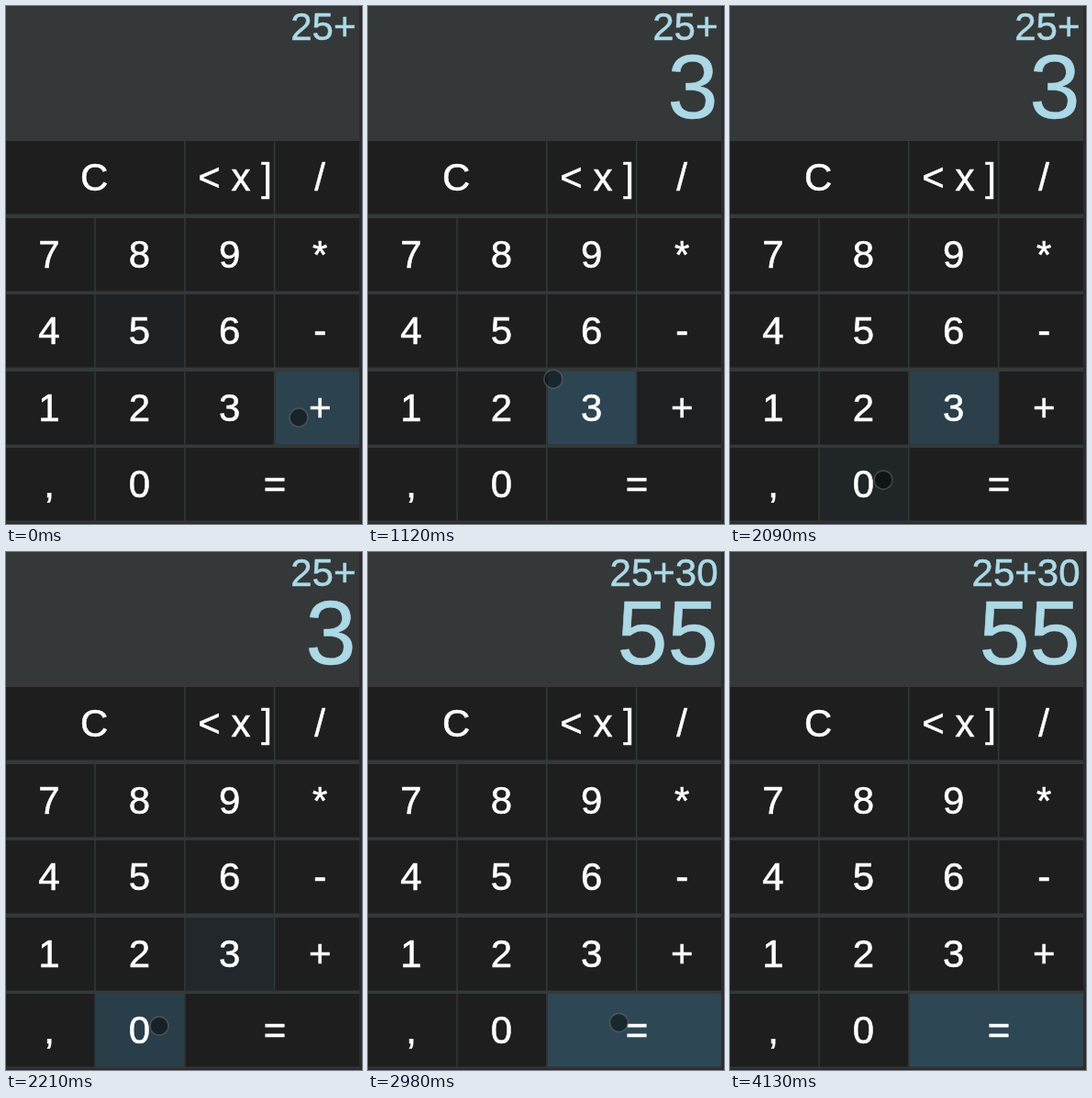
Animation of 388x564 px, one loop 5060 ms. Source, as an HTML page:

```html
<!DOCTYPE html>
<html lang="en">
<head>
<meta charset="utf-8">
<title>Calculator</title>
<style>
  html, body { margin: 0; width: 100%; height: 100%; overflow: hidden; background: #2e2b2d; }
  svg { display: block; width: 388px; height: 564px; }
  text {
    font: 42px "Liberation Sans", Arial, sans-serif; text-anchor: middle; white-space: pre;
    color: #fff; fill: currentColor; stroke: currentColor; stroke-width: .6;
  }
  .out { color: #add8e6; text-anchor: end; }
  .big { font-size: 99px; }
  .key { fill: #1e1e1e; }
  .lit { fill: #2e4755; opacity: 0; }
  #dot { fill: rgba(0, 0, 0, .45); stroke: rgba(110, 115, 118, .5); stroke-width: 1.5; }
</style>
</head>
<body>
<svg viewBox="0 0 388 564">
  <rect width="385" height="562" fill="#343838"/>
  <text class="out" id="expr" x="381.5" y="37"></text>
  <text class="out big" id="value" x="381.5" y="122"></text>
  <g id="keys"></g>
  <circle id="dot" r="10"/>
</svg>
<script>
const LOOP = 5060, STEP = 2980 / 22, FADE = 300;
const COL = 97.8, ROW = 83.6, TOP = 147, EDGE = 385;
const $ = id => document.getElementById(id);

function add(tag, attrs, label = '') {
  const el = document.createElementNS('http://www.w3.org/2000/svg', tag);
  for (const name in attrs) el.setAttribute(name, attrs[name]);
  el.textContent = label;
  return $('keys').appendChild(el);
}

// A repeated character is one wide key
const lit = {};
['CC</', '789*', '456-', '123+', ',0=='].forEach((row, r) => {
  for (const key of new Set(row)) {
    const first = row.indexOf(key), last = row.lastIndexOf(key);
    const x = first * COL, y = Math.round(TOP + r * ROW);
    const width = Math.min(EDGE, (last + 1) * COL - 1.5) - x;
    const box = { x, y, width, height: 79.5 };
    add('rect', { ...box, class: 'key' });
    lit[key] = add('rect', { ...box, class: 'lit' });
    add('text', { x: 47 + 98.4 * (first + last) / 2, y: y + 54 }, key === '<' ? ' < x ]' : key);
  }
});

// Each key takes the focus from the one before it
const presses = [['5', -LOOP], ['+', -200], ['3', 850], ['0', 2000], ['=', 2670]];

const screens = [[0, '25+', ''], [1120, '25+', '3'], [2360, '25+', '30'], [2980, '25+30', '55']];

// Pointer moves: start, duration, target x, target y
const moves = [
  [0, 300, 252, 449], [948, 406, 162, 372], [1354, 406, 167, 516],
  [2303, 406, 273.5, 512.5], [3760, 500, 310, 600]
];

const clamp = p => Math.min(1, Math.max(0, p));
const easeOut = p => 1 - (1 - p) ** 2;

function fade(ms) {
  const p = clamp(ms / FADE) ** .6;
  return p * p * (3 - 2 * p);
}

function pointer(t) {
  let x = 319, y = 448;
  for (const [start, length, toX, toY] of moves) {
    const k = easeOut(clamp((t - start) / length));
    x += (toX - x) * k;
    y += (toY - y) * k;
  }
  return [x, y];
}

function draw(now) {
  const time = Math.max(0, now) % LOOP;
  // Motion is held at a low frame rate
  const t = Math.floor(time / STEP + 1e-6) * STEP;
  const [x, y] = pointer(t);
  $('dot').setAttribute('cx', x);
  $('dot').setAttribute('cy', y);

  const [, expr, value] = screens.findLast(([at]) => at <= time);
  $('expr').textContent = expr;
  $('value').textContent = value;

  presses.forEach(([key, on], i) => {
    const off = presses[i + 1]?.[1] ?? LOOP;
    lit[key].style.opacity = fade(t - on) - fade(t - off);
  });
}

const start = performance.now();
function tick(now) {
  draw(now - start);
  requestAnimationFrame(tick);
}
draw(0);
requestAnimationFrame(tick);
</script>
</body>
</html>
```
